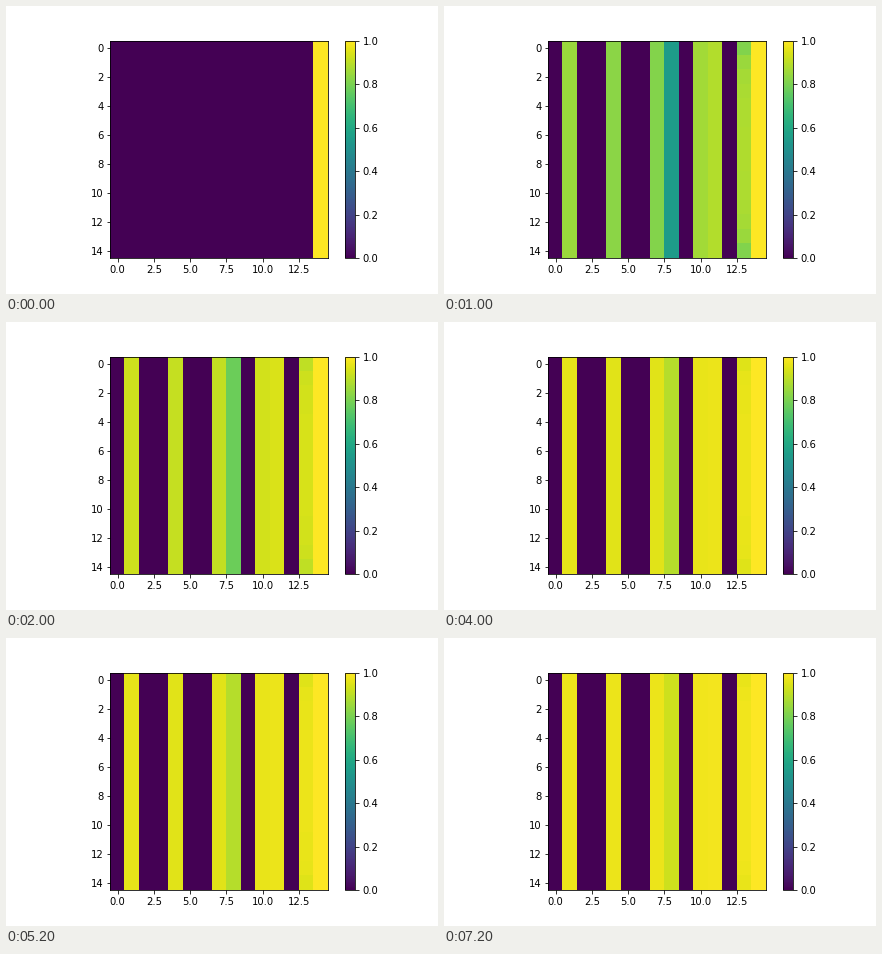
Recreate the animation shown at these times as a matplotlib script. Size 432 px wide and 288 px high, loop 8 s.

```python
import numpy as np
import matplotlib.pyplot as plt
from matplotlib.animation import FuncAnimation

SIZE = 15
# Running averages: open columns miss gap / step, the rest stay at zero.
GAPS = {1: 0.15, 4: 0.175, 7: 0.185, 8: 0.45, 10: 0.14, 11: 0.115}
STEPS = [0, 1, 2, 3, 4, 4, 6, 6]

rows = np.arange(SIZE)
edge = np.minimum(rows, SIZE - 1 - rows)
ragged_gap = 0.12 + 0.07 * np.exp(-0.8 * edge)


def averages(step):
    grid = np.zeros((SIZE, SIZE))
    grid[:, -1] = 1
    if step:
        for col, gap in GAPS.items():
            grid[:, col] = 1 - gap / step
        grid[:, 13] = 1 - ragged_gap / step
    return grid


plt.rcParams["font.family"] = "DejaVu Sans"
fig, ax = plt.subplots(figsize=(6, 4), dpi=72,
                       gridspec_kw={"bottom": 0.125})
image = ax.imshow(averages(0), cmap="viridis", vmin=0, vmax=1,
                  interpolation="nearest")
fig.colorbar(image, ax=ax)


def update(i):
    image.set_data(averages(STEPS[i]))
    return [image]


anim = FuncAnimation(fig, update, frames=len(STEPS), interval=1000,
                     repeat=True, repeat_delay=0)
plt.show()
```
